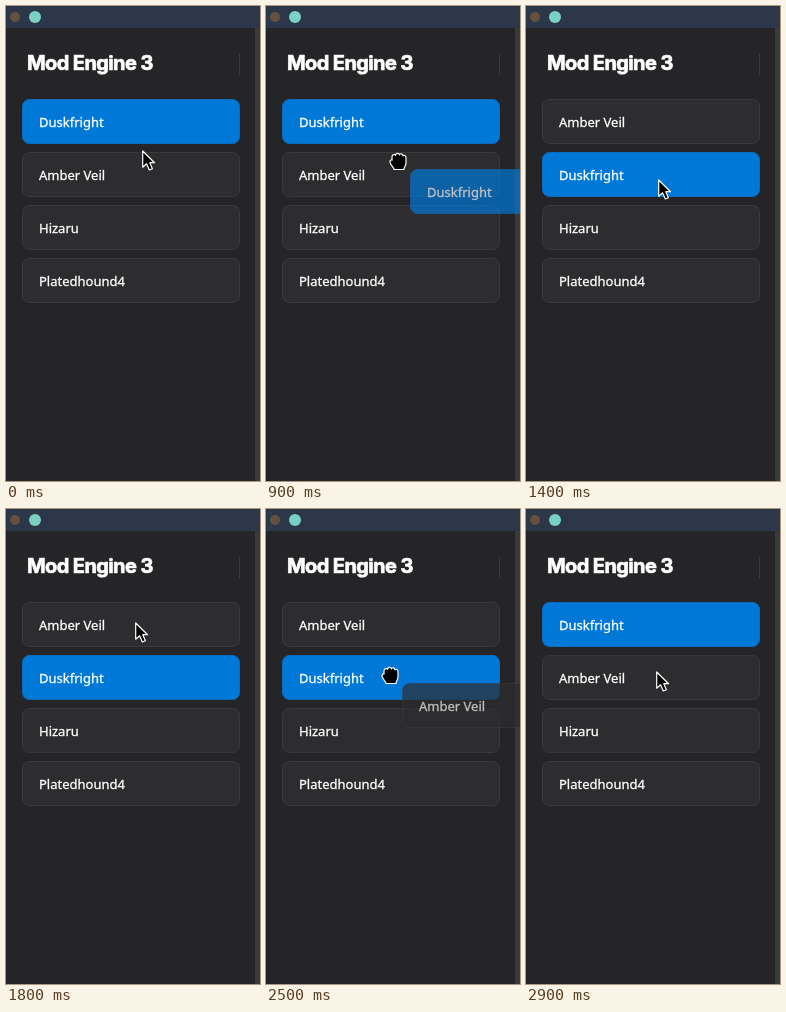
Write an HTML page that moves like this. It is 254 px wide and 475 px high and loops after 3 s.

```html
<!DOCTYPE html>
<html lang="en">
<head>
<meta charset="utf-8">
<title>Reorder list</title>
<style>
  html, body { margin: 0; width: 100%; height: 100%; overflow: hidden; background: #252426; }
  svg { display: block; }
  text { fill: #fff; stroke: #fff; stroke-width: .3; font: 500 13px "Noto Sans", "Open Sans", sans-serif; }
  .title { font: 700 20px Inter, Roboto, sans-serif; letter-spacing: -0.6px; stroke-width: .7; }
  .item rect { fill: #2d2d2f; stroke: #3a3a3c; }
  .item.active rect { fill: #0078d7; stroke: #0a6cbe; }
  .ghost { opacity: .7; }
  #arrow, #hand { stroke: #fff; stroke-width: 1.2; stroke-linejoin: round; }
  #deny { fill: #fff; stroke: #cc2233; stroke-width: 2.2; }
</style>
</head>
<body>
<svg width="254" height="475" viewBox="0 0 254 475">
  <rect width="254" height="475" fill="#252426"/>
  <rect width="254" height="22" fill="#2c384a"/>
  <rect x="249" y="22" width="5" height="453" fill="#3a393b"/>
  <circle cx="9" cy="11" r="5" fill="#66513f"/>
  <circle cx="29" cy="11" r="6" fill="#7bd0c4"/>
  <text class="title" x="21" y="64">Mod Engine 3</text>
  <path d="M233.5 48V69" stroke="#3a3a3c"/>
  <g id="list"></g>
  <path id="arrow" d="M.7 1V17.2L4.6 13.8 7.3 20 10.4 18.7 7.8 12.7H12.6Z"/>
  <path id="hand" d="M-8-2C-8-5-5-5-4.500-3.500-4.500-6-1-6.500-.5-4 0-6 3-5.500 3-3 4-4.500 6-3.500 6-1.500V4C6 7 4 8 4 10.500H-6C-6 8-10 6-10 3-10 1-8.500.5-8 1Z"/>
  <g id="deny">
    <circle r="10.800" stroke="none"/>
    <circle r="8.500"/>
    <path d="M-6.500 3.800L6.500-3.800"/>
  </g>
</svg>
<script>
const names = ["Duskfright", "Amber Veil", "Hizaru", "Platedhound4"];
const list = document.getElementById("list");
const cursors = ["arrow", "hand", "deny"].map(id => document.getElementById(id));

// time, pointer x, pointer y, pointer shape, dragged item, first two swapped
const steps = [
  [0, 136, 144, "arrow", -1, 0],
  [100, 136, 125, "arrow", -1, 0],
  [600, 135, 124, "arrow", -1, 0],
  [800, 134, 140, "deny", 0, 0],
  [900, 134, 153, "hand", 0, 0],
  [1000, 133, 166, "hand", 0, 0],
  [1100, 133, 174, "hand", 0, 0],
  [1400, 132, 173, "arrow", -1, 1],
  [1700, 131, 150, "arrow", -1, 1],
  [1800, 129, 113, "arrow", -1, 1],
  [2000, 128, 110, "arrow", -1, 1],
  [2300, 126.6, 138, "deny", 1, 1],
  [2400, 126.3, 152, "hand", 1, 1],
  [2500, 126, 164, "hand", 1, 1],
  [2600, 125, 172, "hand", 1, 1],
  [2700, 125, 176, "hand", 1, 1],
  [2900, 130, 162, "arrow", -1, 0]
];

const place = (el, x, y) => el.setAttribute("transform", `translate(${x} ${y})`);
const show = (el, on) => el.style.display = on ? "" : "none";

function makeItem(name, i) {
  const g = document.createElementNS("http://www.w3.org/2000/svg", "g");
  g.setAttribute("class", i ? "item" : "item active");
  g.innerHTML = `<rect x=".5" y=".5" width="217" height="44" rx="7"/><text x="17" y="28">${name}</text>`;
  list.append(g);
  return g;
}

const items = names.map(makeItem);
const ghosts = names.slice(0, 2).map(makeItem);
ghosts.forEach(g => g.classList.add("ghost"));

function draw() {
  const t = performance.now() % 3000;
  const [, x, y, shape, dragged, swapped] = steps.findLast(s => s[0] <= t);
  items.forEach((el, i) => place(el, 16, 93 + 53 * (i < 2 ? i ^ swapped : i)));
  ghosts.forEach((el, i) => {
    show(el, i === dragged);
    place(el, x + 10, y + 10);
  });
  for (const el of cursors) {
    show(el, el.id === shape);
    place(el, x, y);
  }
  requestAnimationFrame(draw);
}
draw();
</script>
</body>
</html>
```
